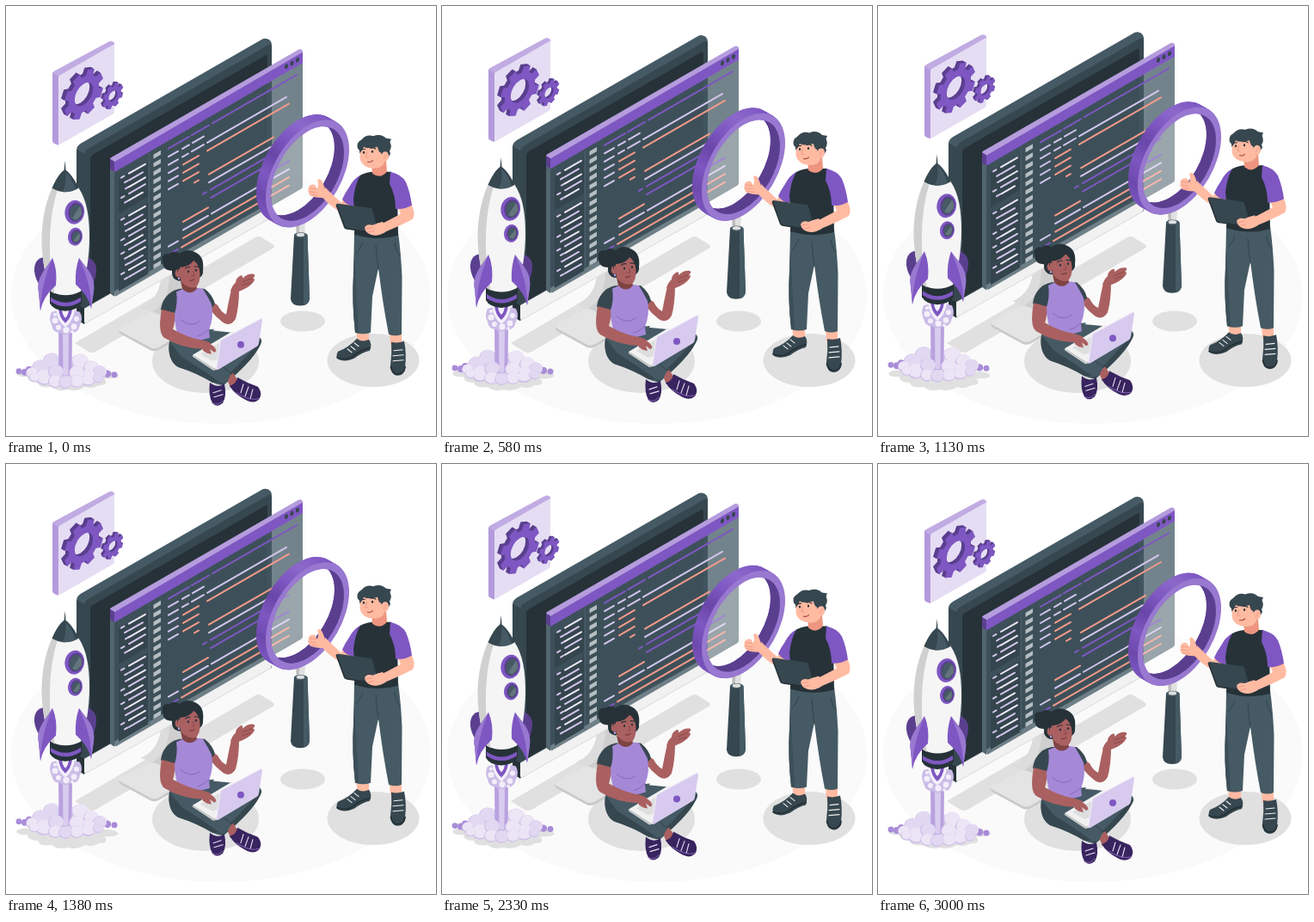
Write an HTML page with a canvas that moves like this. It is 500 px wide and 500 px high and loops after 3.04 s.

```html
<!DOCTYPE html>
<html lang="en">
<head>
<meta charset="utf-8">
<title>Isometric developers</title>
<style>
html, body { margin: 0; width: 100%; height: 100%; overflow: hidden; background: #fff; }
canvas { display: block; width: 100%; height: 100%; }
</style>
</head>
<body>
<canvas id="stage"></canvas>
<script>
const LOOP = 3040, FRAMES = 73, FPS = 24, RISE = 10;
const canvas = document.getElementById('stage');
const dpr = Math.max(1, window.devicePixelRatio || 1);
canvas.width = canvas.height = 500 * dpr;
const ctx = canvas.getContext('2d');

const C = {
  purple: '#7e57c2', mid: '#9878d0', lilac: '#b59cdd', pale: '#e5ddf3', deep: '#5b3f8f',
  ink: '#263238', slate: '#37474f', steel: '#455a64',
  salmon: '#f59a8b', text: '#d3c6ec', grey: '#e0e0e0',
  skin: '#ffbaa2', skinDark: '#ee9580', brown: '#aa6060', brownDark: '#7f4343', shoe: '#38245f'
};

const cache = new Map();
function path(d) {
  if (!cache.has(d)) cache.set(d, new Path2D(d));
  return cache.get(d);
}
function fill(d, color) {
  ctx.fillStyle = color;
  ctx.fill(path(d));
}
function line(d, color, w = 1) {
  ctx.strokeStyle = color;
  ctx.lineWidth = w;
  ctx.stroke(path(d));
}
function oval(x, y, rx, ry, color, turn = 0) {
  ctx.fillStyle = color;
  ctx.beginPath();
  ctx.ellipse(x, y, rx, ry, turn, 0, Math.PI * 2);
  ctx.fill();
}

// Places a flat shape on the wall plane
function onWall(shape, x, y) {
  const p = new Path2D();
  p.addPath(shape, new DOMMatrix([0.866, -0.5, 0, 1, x, y]));
  return p;
}
function disc(...radii) {
  const p = new Path2D();
  for (const r of radii) {
    p.moveTo(r, 0);
    p.arc(0, 0, r, 0, Math.PI * 2);
    p.closePath();
  }
  return p;
}
function extrude(shape, x, y, depth, side, face) {
  for (let i = depth; i >= 0; i -= 0.5) {
    ctx.fillStyle = i ? side : face;
    ctx.fill(onWall(shape, x - i, y - i * 0.577), 'evenodd');
  }
}
function gearShape(R, hole, turn) {
  const p = disc(hole), step = Math.PI / 4;
  for (let k = 0; k < 8; k++) {
    [[-0.25, 0.77], [-0.18, 1], [0.18, 1], [0.25, 0.77]].forEach(([a, s], i) => {
      const t = turn + k * step + a;
      p[k || i ? 'lineTo' : 'moveTo'](Math.cos(t) * R * s, Math.sin(t) * R * s);
    });
  }
  p.closePath();
  return p;
}
const bigGear = gearShape(26.5, 12.3, Math.PI / 8);
const smallGear = gearShape(14, 5.8, Math.PI / 8);

function ground() {
  ctx.fillStyle = '#fff';
  ctx.fillRect(0, 0, 500, 500);
  oval(250, 337, 244, 149, '#fafafa');
  fill('M290 269Q294 267 297 269L310 277Q314 280 310 282L104 402Q100 404 96 402L80 392Z', C.grey);
  oval(232, 413, 62, 37, C.grey);
  oval(427, 412, 53.5, 31, C.grey);
  oval(345, 366.5, 26, 12, C.grey);
  fill('M12 427Q17 422 27 424Q45 413 70 418Q98 413 115 425Q128 425 131 430Q127 434 114 433Q121 441 108 441Q101 446 92 443Q82 449 72 446Q60 449 53 443Q38 445 37 438Q25 438 25 431Q13 432 12 427Z', C.grey);
}

function board() {
  fill('M54 79Q54 77 56 76L120 41.500Q122 40.500 124 41.500L126 43V46L61 83V162L56 160Q54 159 54 156Z', '#c1abe3');
  fill('M54 78L61 82V162L56 160Q54 159 54 156Z', '#b49adc');
  fill('M61 83Q61 81.500 63 80.500L124 45.500Q126 44.500 126 46V123Q126 125 124 126L63 161Q61 162 61 160Z', C.pale);
  extrude(bigGear, 90.5, 103, 4, C.deep, C.purple);
  extrude(smallGear, 124.5, 105, 2.5, C.deep, C.purple);
}

function monitor() {
  // stand
  fill('M132 376Q130 379 134 382L167 400Q172 403 178 400L236 367V360L196 342Z', '#c9c9c9');
  fill('M133 374Q130 377 134 379L167 397Q172 400 178 397L236 363L198 341Z', '#e4e4e4');
  fill('M180 320L213 300V348Q195 356 181 360L157 351Q176 343 180 320Z', '#cfcfcf');
  fill('M180 320L190 315Q189 345 170 356L157 351Q176 343 180 320Z', '#dcdcdc');
  // casing
  fill('M82 168Q82 163 87 160L296 40Q300 37 304 38.500Q309 40 309 46V60L91 185V370L86 367Q82 364 82 360Z', C.steel);
  fill('M82 167L91 172V370L86 367Q82 364 82 360Z', C.slate);
  fill('M91 352L82 347V360Q82 364 86 367L91 370Z', C.ink);
  fill('M91 174Q91 169 96 166L304 46Q309 43 309 49V246L91 370Z', C.slate);
  fill('M98 178Q98 175 101 173L301 58Q304 56 304 60V229L98 347Z', C.ink);
  fill('M91 352L309 228V243Q309 246 306 248L94 369Q91 370 91 367Z', '#f1f1f1');
  line('M91 370L309 246', '#d8d8d8', 0.8);
}

// [row, from x, to x, colour]
const code = [
  [0, 189, 213, 'purple'], [0, 216, 236, 'purple'], [0, 240, 338, 'purple'],
  [1, 189, 200, 'text'], [1, 205, 213, 'text'], [1, 217, 230, 'text'],
  [2, 189, 200, 'text'], [2, 205, 212, 'text'], [2, 216, 230, 'text'], [2, 234, 326, 'text'],
  [3, 189, 200, 'text'], [3, 206, 224, 'salmon'], [3, 234, 329, 'salmon'],
  [4, 189, 200, 'text'], [4, 206, 224, 'salmon'],
  [5, 189, 200, 'text'], [5, 206, 224, 'salmon'],
  [6, 219, 224, 'salmon'], [6, 236, 311, 'salmon'],
  [7, 236, 308, 'text'],
  [8, 229, 233, 'purple'], [8, 238, 329, 'purple'],
  [9, 238, 310, 'purple'],
  [10, 206, 235, 'salmon'], [10, 298, 329, 'purple'],
  [11, 206, 235, 'text'], [11, 239, 329, 'text'],
  [12, 189, 200, 'text'], [12, 206, 329, 'salmon'],
  [13, 189, 200, 'purple'], [13, 204, 329, 'salmon']
];
function slanted(x1, x2, y, color, w) {
  ctx.strokeStyle = color;
  ctx.lineWidth = w;
  ctx.beginPath();
  ctx.moveTo(x1, y);
  ctx.lineTo(x2, y - (x2 - x1) * 0.575);
  ctx.stroke();
}
function panel() {
  ctx.globalAlpha = 0.75;
  fill('M126 193L345 66V210Q345 212 343 213L129 337Q126 339 126 335Z', C.steel);
  ctx.globalAlpha = 1;
  fill('M121 189L126 192V338L123 336Q121 335 121 332Z', '#52666f');
  fill('M131 202L165 182V222L131 242Z', '#35454d');
  fill('M131 249L165 229V312L131 332Z', '#35454d');
  line('M166.500 172V313', '#53666f', 0.8);
  fill('M121 178Q121 177 123 176L340 51Q342 50 344 51L345 53V57L126 184L121 181Z', C.lilac);
  fill('M121 178L126 181V193L121 190Z', C.deep);
  fill('M126 181.500L345 54V66.500L126 193.500Z', C.purple);
  [[326, 70.5], [332.5, 66.8], [339, 63]].forEach(([x, y]) => oval(x, y, 1.9, 2.9, C.slate, 0.3));
  for (let i = 0; i < 14; i++) {
    const y = 174.5 + i * 9.85;
    fill(`M171.500 ${y - 1.5}L180 ${y - 6.4}V${y - 1.4}L171.500 ${y + 3.5}Z`, '#b5bec2');
  }
  const side = (y, i) => {
    const shift = [0, 4, 5, 0, 4][i % 5];
    slanted(134 + shift, 137.5 + shift, y + 5 - shift * 0.575, C.text, 2);
    slanted(143, 162 - (i % 3 === 1 ? 3 : 0), y, i % 2 ? C.text : '#eee8f8', 2);
  };
  for (let i = 0; i < 5; i++) side(195 + i * 7.8, i);
  for (let i = 0; i < 10; i++) side(244 + i * 7.9, i);
  for (const [row, a, b, tone] of code) slanted(a, b, 166 + row * 9.5 - (a - 189) * 0.575, C[tone], 2);
}

const puffs = [
  [53, 413, 10], [86, 414, 10], [69, 412, 9], [40, 421, 10], [99, 421, 9], [30, 427, 7], [109, 426, 8],
  [44, 432, 10], [95, 433, 10], [58, 426, 9], [82, 427, 9], [33, 432, 6], [107, 433, 6], [57, 437, 8], [82, 437, 8], [69, 438, 8]
];
function puff([x, y, r], i) {
  oval(x, y, r, r * 0.92, '#d0c2e8');
  oval(x + r * 0.06, y - r * 0.09, r * 0.93, r * 0.83, i % 3 ? '#ece5f6' : '#e2d8f2');
}
function rocket() {
  [[15, 425, 3.4], [22, 426, 4], [126, 429, 3.5], [118, 428, 4.2], [27, 423, 4]]
    .forEach(([x, y, r]) => oval(x, y, r, r, '#a98cd8'));
  puffs.slice(0, 9).forEach(puff);
  fill('M61 374H77L76.500 428Q69 435 61.500 428Z', '#b9a1df');
  fill('M66 374H73L72.500 430H66.500Z', '#d9ccef');
  puffs.slice(9).forEach(puff);
  fill('M53 356Q69 350 86 356Q90 364 86 371Q84 381 76 380Q69 385 63 380Q54 380 53 371Q49 364 53 356Z', '#cbbce7');
  [[57, 366, 3.5], [61, 374, 3], [70, 377, 3.6], [79, 373, 3.4], [82, 364, 3], [57, 359, 2], [77, 379, 1.8]]
    .forEach(([x, y, r]) => oval(x, y, r, r, '#f3effa'));
  fill('M58 352H80Q79 366 69 374Q59 366 58 352Z', '#f4f0fa');
  fill('M61 352H77Q76 363 69 369Q62 363 61 352Z', C.purple);
  fill('M65 352H73Q73 359 69 363Q65 359 65 352Z', '#f4f0fa');
  // far fins
  fill('M45 292Q32 294 33 309Q34 318 40 326L51 309Z', C.deep);
  fill('M93 292Q106 296 105 309Q104 320 99 327L87 309Z', C.deep);
  // engine
  fill('M51 331V346Q55 354 69 355Q83 354 88 346V331Z', C.ink);
  fill('M52 339Q69 351 87 339V344Q69 355 52 344Z', C.purple);
  // body
  fill('M54 211C44 232 40 260 42 285C44 307 48 322 52 332Q69 341 87 332C93 315 97 293 97 269C97 245 94 226 84 211Z', '#f5f5f5');
  fill('M54 211C44 232 40 260 42 285C44 307 48 322 52 332L57 335C49 301 48 250 60 214Z', '#d0d0d0');
  fill('M68.700 180L69.500 191C76 196 81 204 84.500 212Q69 221 53.500 212C57 204 61 196 67.500 191Z', C.slate);
  fill('M69 193Q77 200 81 213.500Q73 217 66 216.500Q71 205 69 193Z', C.steel);
  // windows
  oval(79.7, 240, 11.3, 14, C.purple, 0.15);
  oval(81, 240, 8.6, 11.2, C.deep, 0.15);
  oval(81.2, 240.5, 7, 9.5, C.steel, 0.15);
  fill('M77 247L86 233Q89 237 88 243L82 249Z', '#64757d');
  oval(80.5, 268.5, 8.5, 10.5, C.purple, 0.15);
  oval(81.5, 268.5, 6.3, 8.3, C.deep, 0.15);
  oval(81.7, 269, 5, 6.8, C.steel, 0.15);
  fill('M78 273L85 264Q87 268 85 272L82 275Z', '#64757d');
  // near fins
  fill('M54 293C47 306 35 315 38 333L40 355Q43 338 58 325Q60 307 54 293Z', C.purple);
  fill('M54 293C47 306 35 315 38 333L40 355Q40 327 54 293Z', C.mid);
  fill('M85 293C91 303 105 313 102 332L99 352Q96 337 81 324Q80 307 85 293Z', C.purple);
  fill('M85 293C91 303 105 313 102 332L99 352Q100 326 85 293Z', C.mid);
}

function woman() {
  // legs
  fill('M232 377L284 382Q301 384 296 394Q288 409 268 428L253 441Q245 441 239 437L236 427Q252 411 263 404L228 402Z', C.steel);
  fill('M297 388Q296 402 268 428L253 441L248 440Q280 408 297 388Z', C.slate);
  fill('M256 432L264 427L270 436L261 444Z', C.brown);
  fill('M195 380C187 390 187 412 200 420Q222 427 240 438L256 439L262 428Q246 413 226 404L242 376Z', C.steel);
  fill('M190 390Q187 412 200 420Q222 427 240 438L249 438Q222 419 204 408Z', C.slate);
  line('M226 404Q246 413 262 428', '#304049', 0.9);
  fill('M237 438Q245 445 254 440Q257 454 252 462Q245 468 240 462Q235 453 237 438Z', C.shoe);
  fill('M260 442Q268 440 269 432Q281 439 293 443Q299 451 294 458Q288 463 280 459Q266 452 260 442Z', C.shoe);
  line('M241 450L250 447M242 455L252 452M273 450L276 440M278 454L282 443M284 457L287 446', '#e9e2f4', 1.1);
  line('M240 462Q247 466 252 459M268 450Q283 460 294 457', '#8768b8', 1);
  // raised arm
  fill('M235 341L246 348Q250 356 256 359Q259 343 262 330L271 329Q271 350 267 364Q261 374 252 368Q244 362 237 353Z', C.brown);
  fill('M261 332Q263 325 267 322Q267 317 272 314Q276 312 275 317Q281 311 288 312Q291 313 287 317Q291 317 287 322Q282 328 271 332Z', C.brown);
  line('M275 321L286 317M275 325L284 322', C.brownDark, 0.7);
  // torso
  fill('M186 339Q191 331 202 329L231 329Q241 337 243 347L235 355L184 354Z', C.slate);
  fill('M197 333L206 329Q213 337 222 328L229 329Q235 339 239 347Q242 362 236 377L237 386Q218 393 200 386Q196 366 194 354Q192 341 197 333Z', '#a589d7');
  line('M203 365Q215 375 225 367M223 384Q231 382 236 376', '#8465bb', 0.9);
  fill('M185 340Q190 333 198 332Q200 346 196 358L180 354Q181 345 185 340Z', C.slate);
  // resting arm
  fill('M181 353L196 357Q197 368 194 376Q211 386 229 389Q240 391 246 400Q244 403 239 401Q243 404 238 406L229 399Q203 398 184 386Q176 380 181 353Z', C.brown);
  // neck and head
  fill('M203 320L221 324L222 329Q214 338 205 329Z', C.brownDark);
  fill('M182 297Q180 288 190 288Q195 284 202 288Q211 281 221 287Q231 292 229 308Q230 313 224 317L201 320Q192 318 193 308Q182 308 182 297Z', C.ink);
  fill('M202 304Q211 303 218 296Q225 301 225.500 311Q226 324 220 327.500Q211 329 204 321Q201 315 202 304Z', C.brown);
  oval(200, 311, 3.4, 4.8, C.brown);
  fill('M200 304Q214 305 220 293Q212 287 204 293Q196 300 200 311Z', C.ink);
  oval(201, 317, 1.2, 1.6, C.lilac);
  oval(212, 309, 1.1, 1.5, C.ink);
  oval(221, 307.5, 1.1, 1.5, C.ink);
  line('M208.500 305.500Q211 303 214 304M219 303L224 303.500', C.ink, 1.1);
  line('M217.500 309L219 314L216 314.500', C.brownDark, 0.8);
  line('M213.500 319.500Q216.500 320 219 318', '#6b2d2d', 1);
  // laptop
  fill('M217 406L264 378L268 383L246 421L242 422Z', '#f1f1f1');
  fill('M217 406L242 422L246 420V423L241 424L217 408Z', '#cfcfcf');
  fill('M226 405L250 391L249 410L240 413Z', '#dedede');
  fill('M228 397Q237 389 243 398Q246 402 242 403L237 399L239 405L234 404L229 401Z', C.brown);
  fill('M251 388L295 364Q298 363 298 366L294 392Q294 394 292 396L247 423Q244 424 245 420L249 391Z', '#d7caee');
  line('M244.500 422L249.500 389L297 363.500', '#f3eefa', 1);
  oval(273, 394, 4, 4, C.purple);
}

const outer = disc(56, 49), hole = disc(49);
function magnifier() {
  const x = 350.5, y = 195.5, depth = 11;
  fill('M337 251L348 250L347 270H338Z', '#e0e0e0');
  fill('M337 251L341 250.500V270H338Z', '#bdbdbd');
  fill('M335 267Q342 262 350.500 267L353 341Q352 349 342 349Q332 349 331 341Z', C.slate);
  fill('M346 265L350.500 267L353 341Q352 347 346 348.500Z', C.steel);
  oval(342.7, 267, 7.8, 3.2, C.steel);
  oval(342.5, 266.5, 4.7, 2.2, '#e0e0e0');
  const side = ctx.createLinearGradient(300, 250, 375, 130);
  [C.purple, '#6d49ad', C.purple, '#6946a8', C.purple, '#8c68cb', C.purple]
    .forEach((c, i) => side.addColorStop(i / 6, c));
  extrude(outer, x, y, depth, side, C.mid);
  ctx.save();
  ctx.clip(onWall(hole, x, y));
  const wall = onWall(hole, x - depth, y - depth * 0.577);
  ctx.fillStyle = 'rgba(255,255,255,.28)';
  ctx.fill(wall);
  wall.rect(250, 80, 200, 220);
  ctx.fillStyle = C.deep;
  ctx.fill(wall, 'evenodd');
  ctx.restore();
}

function man() {
  // feet
  fill('M407 377H422L422 391L409 393Z', C.skin);
  fill('M446 380H460L460 394H447Z', C.skin);
  fill('M386 402Q399 397 408 387Q414 392 422 388Q426 393 423 401Q414 403 405 410Q394 415 386 411Q383 407 386 402Z', C.slate);
  line('M385 409Q396 413 404 407Q413 400 423 398', C.ink, 1.8);
  line('M397 399L402 403M401 396L406 400M405 392L410 396', '#f0f0f0', 1.1);
  fill('M448 391Q455 393 463 390Q466 404 464 421Q463 430 455 430Q447 429 447 418Q449 404 448 391Z', C.slate);
  line('M447.500 420Q450 429 456 428Q463 428 464 420', C.ink, 1.8);
  line('M451 401L461 400M450 407L462 406M450 413L462 412', '#f0f0f0', 1.1);
  // trousers
  fill('M405 264L456 264Q459 285 460.500 315L460 382Q453 385 445 382Q438 346 433 305L426 338L424 380Q415 383 406 380Q402 344 404 312Z', C.steel);
  line('M430 278Q431 292 433 307M415 275Q411 285 407 288M452 276Q453 285 458 290', '#304049', 0.9);
  fill('M405 288L410 380L406 380Q402 344 404 312Z', '#3c4f58');
  // arm towards the ring
  fill('M393 222L404 234Q399 246 389 240Q377 233 367 222L371 211Q382 222 390 229Z', C.skin);
  fill('M412 197Q404 201 399 211Q394 218 391 225Q397 234 407 232L413 216Z', C.purple);
  fill('M362 213Q364 207 362 203Q365 199 368 205Q371 211 371 216L371 223Q363 224 354 221Q350 217 352 211Q354 207 359 208Z', C.skin);
  line('M353 212L361 213M353 216L361 217M355 219.500L362 220.500', C.skinDark, 0.8);
  // torso
  fill('M412 197Q420 193 428 193L448 193Q455 203 455 216L456 267Q432 274 405 266Q406 244 404 224Q406 207 412 197Z', C.ink);
  // neck and head
  fill('M425 183L442 180L443 193Q435 202 426 195Z', C.skinDark);
  fill('M412 163Q427 154 439 164L442 179Q438 190 427 189Q414 188 411.500 178Z', C.skin);
  fill('M409 166Q407 159 413 156Q419 149 427 151.500Q436 148 442 154L448 155Q446 158 447 160Q449 164 446 169L447 172Q445 177 440 182L436 171Q433 170 432 164Q421 167 416 164Q414 169 411 172Q412 168 409 166Z', C.slate);
  oval(440.5, 175.5, 4.5, 6, C.skin, 0.2);
  line('M439.500 178Q440 173 443 173', C.skinDark, 0.8);
  oval(416, 170.5, 1.1, 1.5, C.ink);
  oval(426, 169.5, 1.1, 1.5, C.ink);
  line('M413.500 167L417.500 166.500M424 165.500Q427 164.500 430 166.500', C.ink, 1.1);
  line('M419.500 170L418 176L421 176.500', C.skinDark, 0.9);
  line('M420.500 181.500Q424 182.500 426.500 180', '#a6483d', 1.1);
  // tablet arm
  fill('M454 231L471 230Q477 242 473 248Q460 255 443 262Q432 269 423 265L418 259Q428 252 440 252L459 242Z', C.skin);
  fill('M447 193Q460 196 465 205Q470 217 472 232Q463 237 453 236Q453 220 446 207Z', C.purple);
  fill('M386 230L423 235Q425 235 426 237L432 260Q433 264 429 264L396 259Q394 259 393 256L384 233Q383 230 386 230Z', C.slate);
  line('M384.500 232L393.500 257Q394 259 397 259.300L429 264', C.ink, 1.5);
  fill('M417 258Q419 253 426 255L438 251L441 263Q432 269 424 266Q418 264 417 258Z', C.skin);
  line('M419 259L426 258M421 263L428 261.500', C.skinDark, 0.8);
}

function lifted(dy, ...parts) {
  ctx.save();
  ctx.translate(0, dy);
  parts.forEach(part => part());
  ctx.restore();
}

function draw(frame) {
  const u = ((frame + 1) % FRAMES) / FRAMES;
  const dy = -RISE * (1 - Math.abs(1 - 2 * u));
  ctx.setTransform(dpr, 0, 0, dpr, 0, 0);
  ctx.lineCap = ctx.lineJoin = 'round';
  ground();
  lifted(dy, board, monitor, panel, rocket, woman);
  lifted(dy * 2, magnifier);
  lifted(dy, man);
}

let shown = -1;
const start = performance.now();
function tick() {
  const t = (performance.now() - start) % LOOP;
  const frame = Math.min(FRAMES - 1, Math.floor((t + 5) * FPS / 1000));
  if (frame !== shown) draw(shown = frame);
  requestAnimationFrame(tick);
}
tick();
</script>
</body>
</html>
```
